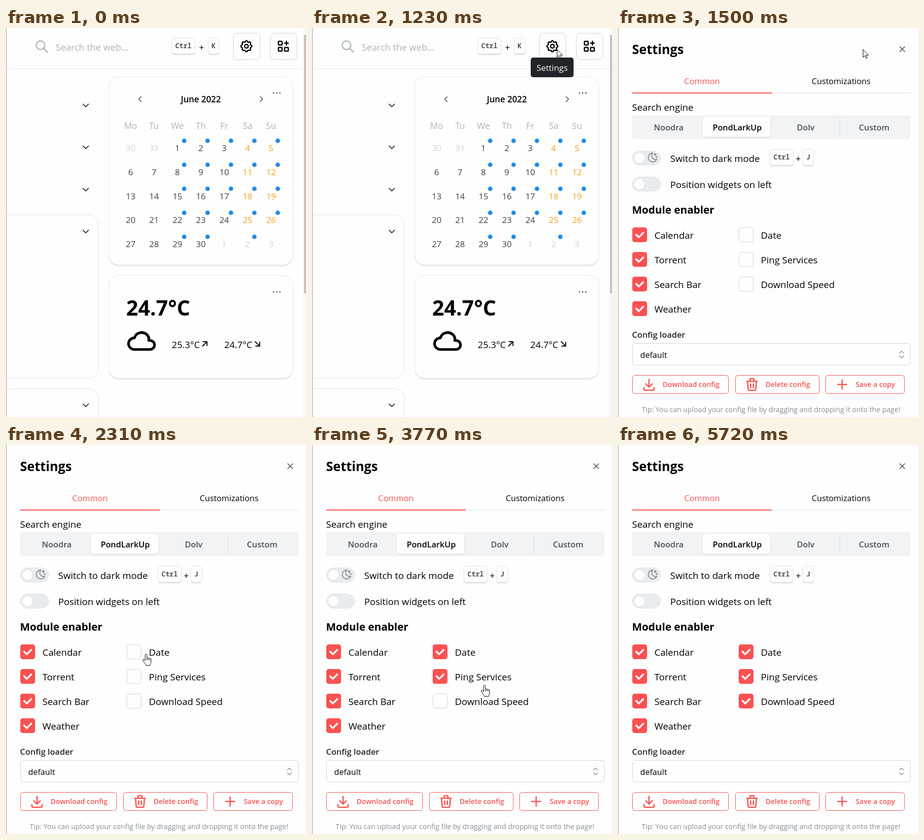
These frames come from a looping animation (609x790 px, 6140 ms). An HTML page:

```html
<!DOCTYPE html>
<html lang="en">
<head>
<meta charset="utf-8">
<title>Settings drawer</title>
<style>
  html, body { margin: 0; width: 100%; height: 100%; overflow: hidden; background: #fefefe; }
  svg { display: block; width: 609px; height: 790px; }
  text { font-family: "Open Sans", "Noto Sans", sans-serif; white-space: pre; }
  .mono { font-family: "Noto Sans Mono", "DejaVu Sans Mono", monospace; }
  .line { fill: none; stroke-linecap: round; stroke-linejoin: round; }
</style>
</head>
<body>
<svg id="stage" viewBox="0 0 609 790" xmlns="http://www.w3.org/2000/svg"></svg>
<script>
const LOOP = 6140;
const PAPER = '#fefefe', RED = '#fa5252', GREY = '#868e96', PALE = '#adb5bd', EDGE = '#ced4da', INK = '#000';

// Drawing helpers
const text = (s, x, y, size, { fill = INK, weight = 400, mid = false, cls = '' } = {}) =>
  `<text x="${x}" y="${y}" font-size="${size}" fill="${fill}" font-weight="${weight}" class="${cls}"` +
  `${mid ? ' text-anchor="middle"' : ''}>${s}</text>`;

const rect = (x, y, w, h, r = 0, fill = PAPER, extra = '') =>
  `<rect x="${x}" y="${y}" width="${w}" height="${h}" rx="${r}" fill="${fill}" ${extra}/>`;

const box = (x, y, w, h, r, stroke, fill = PAPER) =>
  rect(x + .5, y + .5, w - 1, h - 1, r, fill, `stroke="${stroke}"`);

const line = (d, stroke = INK, width = 1.5, extra = '') =>
  `<path class="line" d="${d}" stroke="${stroke}" stroke-width="${width}" ${extra}/>`;

const icon = (body, x, y, scale) => `<g transform="translate(${x} ${y}) scale(${scale})">${body}</g>`;
const circle = (x, y, r, fill, extra = '') => `<circle cx="${x}" cy="${y}" r="${r}" fill="${fill}" ${extra}/>`;

const key = (s, x, y, w) =>
  rect(x, y, w, 35, 5, '#dee2e6') + rect(x + 1, y + 1, w - 2, 31, 4, PAPER) +
  text(s, x + w / 2, y + 21, 13.8, { fill: '#495057', weight: 700, mid: true, cls: 'mono' });

const card = (y, h) =>
  rect(208, y, 375, h, 21, '#e9e9ea') + rect(209, y + 1, 373, h - 4.5, 20, PAPER) +
  [-6.5, 0, 6.5].map(d => circle(549.5 + d, y + 34, 1.4, '#495057')).join('');

const gear = Array.from({ length: 8 }, (_, i) =>
  line('M10.325 4.317c.426-1.756 2.924-1.756 3.35 0a1.724 1.724 0 0 0 2.573 1.066', INK, 2,
    `transform="rotate(${i * 45} 12 12)"`)).join('') +
  line('M15 12a3 3 0 1 1-6 0a3 3 0 1 1 6 0', INK, 2);

const tile = line('M5 4h4a1 1 0 0 1 1 1v4a1 1 0 0 1-1 1h-4a1 1 0 0 1-1-1v-4a1 1 0 0 1 1-1z', INK, 2);
const apps = tile + icon(tile, 0, 10, 1) + icon(tile, 10, 10, 1) + line('M14 7h6M17 4v6', INK, 2);

const cloud = line('M6.657 18c-2.572 0-4.657-2.007-4.657-4.483c0-2.475 2.085-4.482 4.657-4.482' +
  'c.393-1.762 1.794-3.2 3.675-3.773c1.88-.572 3.956-.193 5.444 1c1.488 1.19 2.162 3.007 1.77 4.769' +
  'h.99c1.913 0 3.464 1.56 3.464 3.486c0 1.927-1.551 3.487-3.465 3.487z', INK, 2);

function calendar() {
  const colX = i => 253 + 47.5 * i;
  let out = card(98, 386) +
    line('M274.5 139.5l-5 5l5 5', '#343a40', 1.3) + line('M516 139.5l5 5l-5 5', '#343a40', 1.3) +
    text('June 2022', 395.5, 151, 17.3, { weight: 600, mid: true });
  ['Mo', 'Tu', 'We', 'Th', 'Fr', 'Sa', 'Su'].forEach((d, i) =>
    out += text(d, colX(i), 205, 17.6, { fill: PALE, mid: true }));
  for (let n = 0; n < 35; n++) {
    const col = n % 7, y = 48.75 * Math.floor(n / 7), day = n - 1;
    const outside = day < 1 || day > 30;
    const label = day < 1 ? day + 31 : day > 30 ? day - 30 : day;
    const fill = outside ? EDGE : col > 4 ? '#ff9f1a' : '#3b4046';
    out += text(label, colX(col), 250 + y, 17.2, { fill, mid: true });
    if (col > 1 && (!outside || label === 2)) out += circle(colX(col) + 13.7, 229 + y, 4.5, '#228be6');
  }
  return out;
}

function page() {
  const chevrons = [157, 242, 328, 413, 766].map(y => line(`M156.5 ${y - 2.5}l5.5 5.5l5.5-5.5`)).join('');
  return rect(0, 0, 609, 790) + rect(0, 82, 603, 1, 0, '#e9ecef') +
    icon(line('M17 10a7 7 0 1 1-14 0a7 7 0 1 1 14 0M21 21l-6-6', PALE, 2), 57.5, 22.5, 1.25) +
    text('Search the web...', 101, 46, 18.6, { fill: PALE }) +
    key('Ctrl', 336, 20, 48) + text('+', 397, 46, 18, { mid: true }) + key('K', 410, 20, 23) +
    box(461, 10, 55, 55, 8, EDGE) + icon(gear, 473, 22, 1.25) +
    box(536, 10, 55, 55, 8, EDGE) + icon(apps, 548, 22, 1.25) +
    box(-40, 379, 228, 333, 20, '#dee2e6') + box(-40, 732, 228, 200, 20, '#dee2e6') + chevrons +
    calendar() + card(502, 212) +
    text('24.7°C', 244, 584, 42.4, { weight: 700 }) + icon(cloud, 243.4, 605.4, 2.64) +
    text('25.3°C', 336.5, 650, 18.8) + line('M399 646l9-9M400 637h8v8', INK, 1.9) +
    text('24.7°C', 443, 650, 18.8) + line('M506 637l9 9M515 638v8h-8', INK, 1.9);
}

const toggle = y => box(29, y, 58, 30, 14.5, '#dee2e6', '#e9ecef') +
  circle(43.5, y + 15, 11, PAPER, 'stroke="#dee2e6"');

function checkbox(label, x, y, id) {
  const tick = rect(x, y, 30, 30, 5, RED) + line(`M${x + 7.8} ${y + 14.6}l5.4 5.4l9-9`, '#fff', 3.6);
  return box(x, y, 30, 30, 5, EDGE) + `<g ${id ? `id="${id}"` : ''}>${tick}</g>` + text(label, x + 45, y + 23, 19);
}

const button = (label, x, w, tx, art, ix) =>
  box(x, 705, w, 38, 5, RED) + icon(line(art, RED, 2), ix, 708.4, 1.3) +
  text(label, tx, 729, 14.3, { fill: RED, weight: 600 });

function drawer() {
  const engines = ['Noodra', 'PondLarkUp', 'Dolv', 'Custom'].map((s, i) =>
    text(s, 103 + 139 * i, 208, 16.7, { fill: i === 1 ? INK : '#495057', weight: 600, mid: true })).join('');
  const moon = line('M12 3c.132 0 .263 0 .393 0a7.5 7.5 0 0 0 7.92 12.446a9 9 0 1 1-8.313-12.454z' +
    'M17 4a2 2 0 0 0 2 2a2 2 0 0 0-2 2a2 2 0 0 0-2-2a2 2 0 0 0 2-2M19 11h2m-1-1v2', GREY, 1.8);
  return rect(-1, 0, 610, 790) +
    text('Settings', 28.5, 53, 26, { weight: 700 }) + line('M572 38l10 10M582 38l-10 10', '#343a40', 1.4) +
    text('Common', 170.5, 114, 16.8, { fill: RED, mid: true }) +
    text('Customizations', 453, 114, 16.6, { mid: true }) +
    rect(29, 131, 565, 2, 0, '#e9ecef') + rect(29, 131, 283, 2, 0, RED) +
    text('Search engine', 28.5, 168, 19) + rect(29, 177, 565, 49, 5, '#f1f3f5') +
    rect(171, 181, 139, 42, 6, '#000', 'opacity=".07"') + rect(172, 181, 137, 40, 5) +
    rect(450, 181, 1, 40, 0, '#dee2e6') + engines +
    toggle(249) + icon(moon, 58.5, 251, 1) + text('Switch to dark mode', 106, 272, 19) +
    key('Ctrl', 308, 246, 48) + text('+', 366, 272, 18, { mid: true }) + key('J', 375, 246, 23) +
    toggle(302) + text('Position widgets on left', 106, 325, 19) +
    text('Module enabler', 28.5, 377, 21.3, { weight: 700 }) +
    ['Calendar', 'Torrent', 'Search Bar', 'Weather'].map((s, i) => checkbox(s, 29, 405 + 50 * i)).join('') +
    ['Date', 'Ping Services', 'Download Speed'].map((s, i) => checkbox(s, 245, 405 + 50 * i, 'tick' + i)).join('') +
    text('Config loader', 28.5, 629, 16.8, { weight: 600, fill: '#212529' }) +
    box(29, 640, 565, 45, 5, EDGE) + text('default', 45, 670, 16.6) +
    line('M571.5 660l4-4l4 4M571.5 666l4 4l4-4', GREY, 1.4) +
    button('Download config', 29, 196, 90.5, 'M4 17v2a2 2 0 0 0 2 2h12a2 2 0 0 0 2-2v-2M7 11l5 5l5-5M12 4v12', 47.4) +
    button('Delete config', 238, 171, 299.5, 'M4 7h16M10 11v6M14 11v6M5 7l1 12a2 2 0 0 0 2 2h8a2 2 0 0 0 2-2l1-12M9 7v-3a1 1 0 0 1 1-1h4a1 1 0 0 1 1 1v3', 256.4) +
    button('Save a copy', 421, 161, 482.5, 'M12 5v14M5 12h14', 439.4) +
    text('Tip: You can upload your config file by dragging and dropping it onto the page!', 48, 780, 14.45, { fill: GREY });
}

const pointer = (id, d) => `<g id="${id}"><path d="${d}" fill="#fff" stroke="#000" stroke-linejoin="round"/></g>`;
const $ = id => document.getElementById(id);

$('stage').innerHTML =
  '<clipPath id="view"><rect id="clip" x="1" y="0" width="602" height="790"/></clipPath>' +
  page() +
  `<g id="tip">${rect(444, 60, 87, 40, 5, '#212529')}${text('Settings', 487.5, 87, 17, { fill: '#fff', mid: true })}</g>` +
  `<g clip-path="url(#view)"><rect id="shade" width="609" height="790" opacity=".75"/><g id="drawer">${drawer()}</g></g>` +
  `<g id="bar">${rect(603, 0, 6, 790, 0, '#f8f8f8')}${rect(605, 14, 4, 525, 0, '#c1c1c1')}</g>` +
  rect(0, 0, 1, 790, 0, '#999') +
  pointer('arrow', 'M.5 .5v16l3.7-3.5l2.5 5.6l2.3-1l-2.5-5.4h5z') +
  pointer('hand', 'M5.5 14V2.5a1.8 1.8 0 0 1 3.6 0V9a1.6 1.6 0 0 1 3 .6a1.5 1.5 0 0 1 2.8 .7a1.4 1.4 0 0 1 2.6 1V16c0 3-1.5 4-2 7.5H7c-.5-2.5-3-4.5-4.5-7.5L.8 12.5c-.6-1.3 1.2-2.2 2.2-1.1zM9.1 9v4M12.1 9.6v3.5M14.9 10.3v3') +
  `<g id="beam">${line('M.5 .5h2l1 1l1-1h2M3.5 1.5v13M.5 15.5h2l1-1l1 1h2', INK, 1)}</g>`;

// Pointer steps: time, shape, x, y
const moves = [
  [0, '', 0, 0], [410, 'arrow', 588, 216], [560, 'arrow', 556, 146], [680, 'arrow', 518, 63],
  [830, 'arrow', 500, 47], [980, 'arrow', 497, 43], [1770, 'arrow', 484, 92], [1890, 'arrow', 404, 250],
  [2010, 'arrow', 322, 388], [2160, 'hand', 279, 424], [2310, 'hand', 277, 424], [2700, 'hand', 300, 430],
  [2820, 'arrow', 328, 446], [2970, 'hand', 326, 458], [3620, 'hand', 337, 479], [3770, 'hand', 343, 487],
  [3890, 'arrow', 353, 503], [4040, 'hand', 339, 513], [4190, 'hand', 335, 516], [4320, 'hand', 333, 518],
  [4870, 'arrow', 393, 568], [5020, 'arrow', 439, 578], [5170, 'arrow', 492, 464], [5300, 'arrow', 528, 511],
  [5450, 'arrow', 552, 622], [5570, 'beam', 572, 764], [5720, '', 0, 0]
];
const show = (id, on) => $(id).setAttribute('visibility', on ? 'visible' : 'hidden');
const shapes = ['arrow', 'hand', 'beam'];

function draw(t) {
  const [, shape, x, y] = moves.findLast(m => m[0] <= t);
  shapes.forEach(s => show(s, s === shape));
  if (shape) $(shape).setAttribute('transform', `translate(${x} ${y})`);

  const opened = t >= 1500, sliding = t >= 1350 && !opened;
  show('tip', t >= 830 && t < 1350);
  $('tip').setAttribute('transform', t < 980 ? 'translate(0 5)' : '');
  $('tip').setAttribute('opacity', t < 980 ? .6 : 1);

  show('shade', sliding);
  show('bar', !opened);
  $('drawer').style.display = opened || sliding ? '' : 'none';
  $('drawer').setAttribute('transform', `translate(${sliding ? 177 : 0} 0)`);
  $('drawer').setAttribute('opacity', sliding ? .7 : 1);
  $('clip').setAttribute('width', opened ? 608 : 602);

  $('tick0').setAttribute('opacity', t >= 2550 ? 1 : 0);
  $('tick1').setAttribute('opacity', t >= 3490 ? 1 : 0);
  $('tick2').setAttribute('opacity', t >= 4750 ? 1 : t >= 4600 ? .8 : 0);
}

const start = performance.now();
function tick() {
  draw((performance.now() - start) % LOOP);
  requestAnimationFrame(tick);
}
tick();
</script>
</body>
</html>
```
